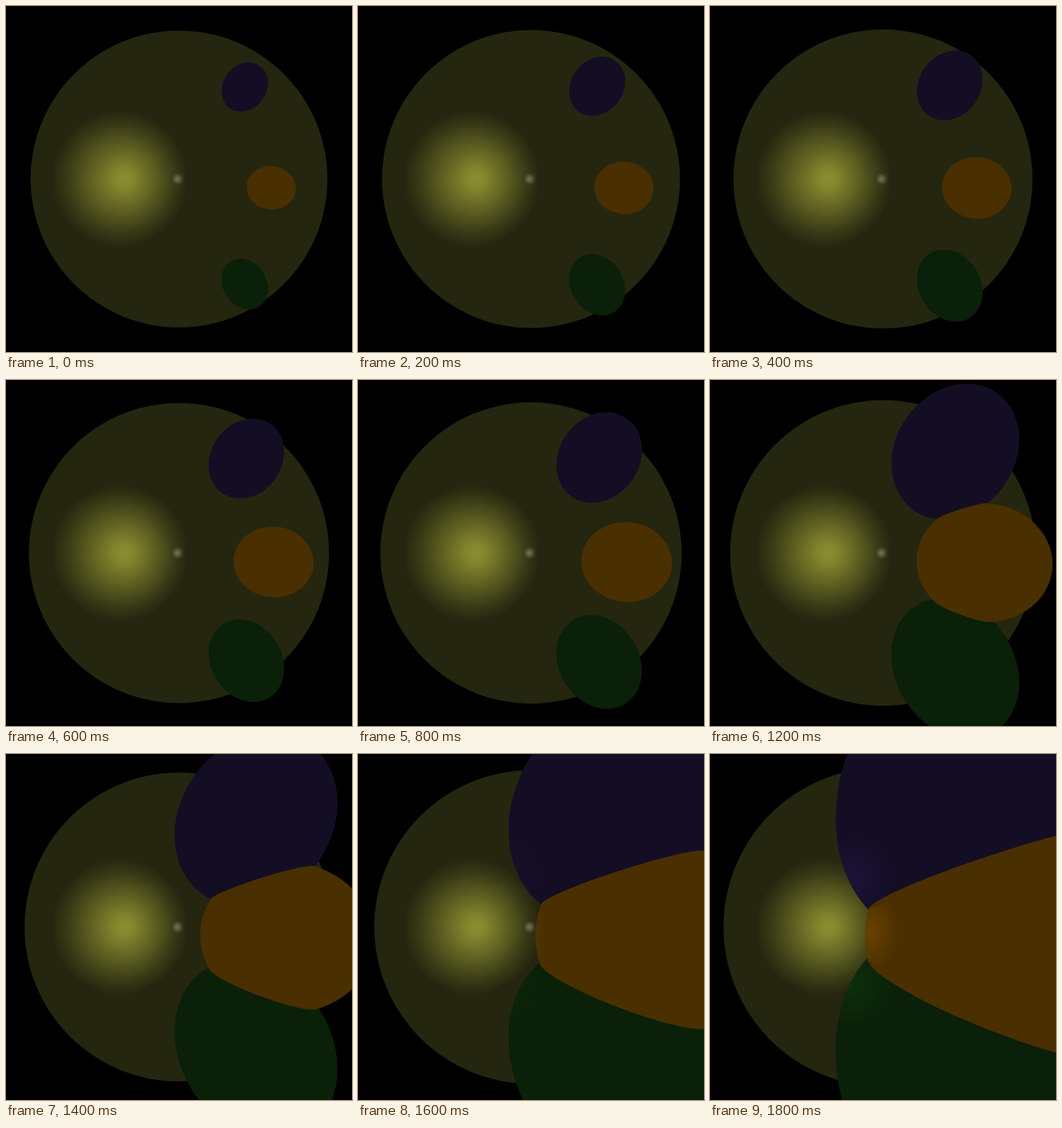
Write an HTML page without scripts that moves like this. It is 512 px wide and 512 px high and loops after 2 s.

```html
<!DOCTYPE html>
<html lang="en">
<head>
<meta charset="utf-8">
<title>Growing spheres</title>
<style>
  html, body { margin: 0; width: 100%; height: 100%; overflow: hidden; background: #000; }
  svg { display: block; width: 100vw; height: 100vh; animation: grow 2s step-end infinite; }

  /* --r: sphere radius at depth 1; the camera's focal length is 256px */
  @keyframes grow {
    0%   { --r: .125; --glow: 0; --wedge: path("M0 0H512V512H0Z"); }
    10%  { --r: .15;  --glow: 0; --wedge: path("M0 0H512V512H0Z"); }
    20%  { --r: .175; --glow: 0; --wedge: path("M0 0H512V512H0Z"); }
    30%  { --r: .2;   --glow: 0; --wedge: path("M0 0H512V512H0Z"); }
    40%  { --r: .225; --glow: 0; --wedge: path("M0 0H512V512H0Z"); }
    50%  { --r: .275; --glow: 0; --wedge: path("M0 0H512V512H0Z"); }
    60%  { --r: .325; --glow: 0; --wedge: path("M-244 388L768 69.1V488.7L-219 125Z"); }
    70%  { --r: .4;   --glow: 0; --wedge: path("M-244 388L768 66.5V493.2L-219 125Z"); }
    80%  { --r: .5;   --glow: .5; --wedge: path("M-244 388L768 61.8V501.7L-219 125Z"); }
    90%, 100% { --r: .625; --glow: 1; --wedge: path("M-244 388L768 52.4V518.4L-219 125Z"); }
  }

  .back { r: calc(215.5px + 32.8px * var(--r)); }
  .wedge { d: var(--wedge); }
  .glow { opacity: var(--glow); }

  /* Outline of a sphere seen in perspective; --t is its distance from the axis */
  .ball {
    --r2: calc(var(--r) * var(--r));
    --k: calc(1 - var(--r2));
    cx: calc(256px * var(--t) / var(--k));
    rx: calc(256px * var(--r) * sqrt(1 + var(--t) * var(--t) - var(--r2)) / var(--k));
    ry: calc(256px * var(--r) / sqrt(var(--k)));
  }

  /* Circle where two spheres meet; --h2 is the squared half distance of their centres */
  .seam {
    --q: max(0, var(--r) * var(--r) - var(--h2));
    --k: calc(1 - var(--q));
    cx: calc(256px / var(--k));
    rx: calc(256px * sqrt(var(--q)) / var(--k));
    ry: calc(256px * sqrt(var(--q) / var(--k)));
  }
</style>
</head>
<body>
<svg viewBox="0 0 512 512">
  <defs>
    <radialGradient id="light" gradientUnits="userSpaceOnUse" cx="168" cy="256" r="101" fx="176" fy="256">
      <stop offset="0" stop-color="#8c8f30"/>
      <stop offset=".15" stop-color="#82852d"/>
      <stop offset=".5" stop-color="#5a5c20"/>
      <stop offset=".8" stop-color="#373916"/>
      <stop offset="1" stop-color="#25260f"/>
    </radialGradient>
    <radialGradient id="spark">
      <stop offset="0" stop-color="#74755a"/>
      <stop offset=".4" stop-color="#5b5c42" stop-opacity=".8"/>
      <stop offset="1" stop-color="#25260f" stop-opacity="0"/>
    </radialGradient>
    <radialGradient id="violetGlow">
      <stop offset="0" stop-color="#1d1238"/>
      <stop offset="1" stop-color="#1d1238" stop-opacity="0"/>
    </radialGradient>
    <radialGradient id="greenGlow">
      <stop offset="0" stop-color="#0d2f0c"/>
      <stop offset="1" stop-color="#0d2f0c" stop-opacity="0"/>
    </radialGradient>
    <radialGradient id="orangeGlow">
      <stop offset="0" stop-color="#684200"/>
      <stop offset="1" stop-color="#684200" stop-opacity="0"/>
    </radialGradient>

    <clipPath id="wedge"><path class="wedge"/></clipPath>
    <clipPath id="violet">
      <ellipse class="ball" style="--t:.6438" transform="translate(256 256) rotate(-54.48)"/>
    </clipPath>
    <clipPath id="green">
      <ellipse class="ball" style="--t:.7053" transform="translate(256 256) rotate(57.98)"/>
    </clipPath>
  </defs>

  <rect width="512" height="512"/>
  <circle class="back" cx="256" cy="256" fill="#25260f"/>
  <circle cx="168" cy="256" r="101" fill="url(#light)"/>
  <circle cx="253.5" cy="256" r="12" fill="url(#spark)"/>

  <g clip-path="url(#violet)">
    <rect width="512" height="512" fill="#140e24"/>
    <circle class="glow" cx="212" cy="182" r="62" fill="url(#violetGlow)"/>
  </g>
  <g clip-path="url(#green)">
    <rect width="512" height="512" fill="#0a2008"/>
    <circle class="glow" cx="212" cy="342" r="62" fill="url(#greenGlow)"/>
  </g>

  <!-- The orange sphere is nearest: its outline cut at the seams, plus the seam discs -->
  <g fill="#4a2f00">
    <g clip-path="url(#wedge)">
      <ellipse class="ball" style="--t:.5274" transform="translate(256 256) rotate(5.44)"/>
    </g>
    <ellipse class="seam" style="--h2:.0881" transform="matrix(.4495 -.237 .967 -.2544 256 256)"/>
    <ellipse class="seam" style="--h2:.0808" transform="matrix(.4495 .324 .964 .2657 256 256)"/>
  </g>
  <clipPath id="orange">
    <ellipse class="ball" style="--t:.5274" transform="translate(256 256) rotate(5.44)"/>
  </clipPath>
  <g clip-path="url(#wedge)">
    <g clip-path="url(#orange)">
      <ellipse class="glow" cx="238" cy="262" rx="42" ry="62" fill="url(#orangeGlow)"/>
    </g>
  </g>
</svg>
</body>
</html>
```
